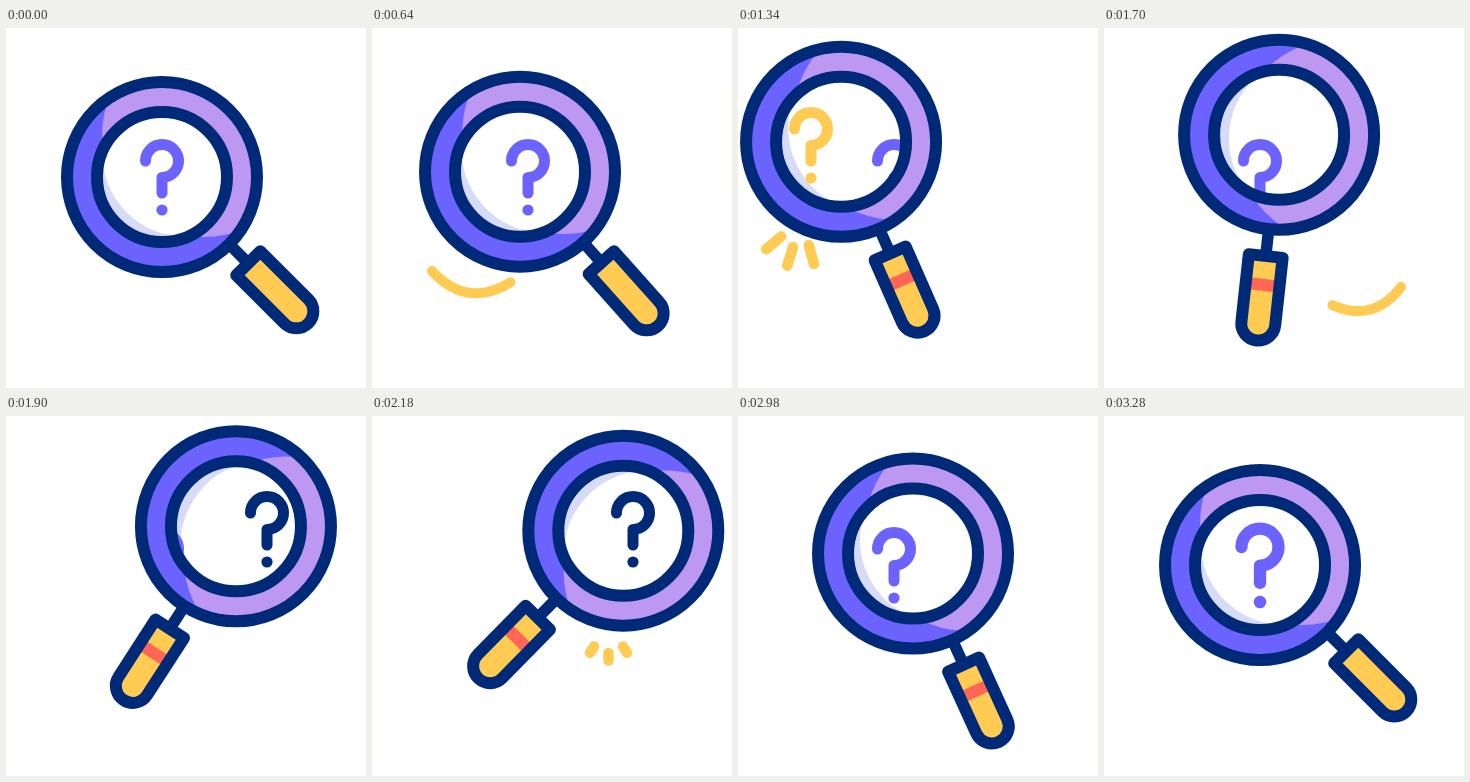
Animation of 360x360 px, one loop 3.3 s. Source, as an HTML page with a canvas:

```html
<!DOCTYPE html>
<html lang="en">
<head>
<meta charset="utf-8">
<title>Searching magnifier</title>
<style>
html, body { margin: 0; width: 100%; height: 100%; overflow: hidden; background: #fff; }
canvas { display: block; width: 360px; height: 360px; }
</style>
</head>
<body>
<canvas id="stage"></canvas>
<script>
const LOOP = 3300, TAU = Math.PI * 2;
const NAVY = '#002a77', PURPLE = '#6c63ff', LILAC = '#bd98f2';
const YELLOW = '#ffcb52', RED = '#ff6655', PALE = '#d8dbf6';

const canvas = document.getElementById('stage');
const dpr = window.devicePixelRatio || 1;
canvas.width = canvas.height = 360 * dpr;
const ctx = canvas.getContext('2d');

const clamp = v => Math.min(1, Math.max(0, v));
const mix = (a, b, p) => a + (b - a) * p;
const span = (t, a, b) => clamp((t - a) / (b - a));

// cubic-bezier(x1, 0, x2, 1), solved by bisection
function ease(x1, x2, t) {
  if (t <= 0 || t >= 1) return clamp(t);
  let lo = 0, hi = 1;
  for (let i = 0; i < 24; i++) {
    const s = (lo + hi) / 2, r = 1 - s;
    if (3 * r * r * s * x1 + 3 * r * s * s * x2 + s * s * s < t) lo = s; else hi = s;
  }
  return lo * lo * (3 - 2 * lo);
}

const HOME = { x: 156, y: 149, a: 45 };
const LEFT = { x: 103, y: 113.7, a: 66.3 };
const RIGHT = { x: 251.3, y: 114.7, a: 134.5 };
const MOVES = [
  { from: HOME, to: LEFT, start: 320, end: 1370, curve: [0.5, 0.6], bend: [0, 0] },
  { from: LEFT, to: RIGHT, start: 1370, end: 2090, curve: [0.333, 0.667], bend: [7, -7.5] },
  { from: RIGHT, to: HOME, start: 2450, end: 3300, curve: [0.6, 0.4], bend: [-4, -5] }
];

function poseAt(t) {
  const m = MOVES.filter(m => t >= m.start).pop() || MOVES[0];
  const p = ease(m.curve[0], m.curve[1], span(t, m.start, m.end));
  const k = 4 * p * (1 - p);
  return {
    x: mix(m.from.x, m.to.x, p) + m.bend[0] * k,
    y: mix(m.from.y, m.to.y, p) + m.bend[1] * k,
    a: mix(m.from.a, m.to.a, p) * Math.PI / 180
  };
}

function circle(x, y, r) {
  ctx.beginPath();
  ctx.arc(x, y, r, 0, TAU);
}

function disc(x, y, r, color) {
  circle(x, y, r);
  ctx.fillStyle = color;
  ctx.fill();
}

function ink(color, width) {
  ctx.strokeStyle = color;
  ctx.lineWidth = width;
  ctx.stroke();
}

function line(x1, y1, x2, y2, color, width) {
  ctx.beginPath();
  ctx.moveTo(x1, y1);
  ctx.lineTo(x2, y2);
  ink(color, width);
}

function question(x, y, color, scale) {
  ctx.save();
  ctx.translate(x, y);
  ctx.scale(scale, scale);
  ctx.beginPath();
  ctx.arc(0, -16, 16.5, Math.PI, Math.PI * 2.5);
  ctx.lineTo(0, 16);
  ink(color, 11);
  disc(0, 33, 5.6, color);
  ctx.restore();
}

function inLens(pose, radius, draw) {
  ctx.save();
  ctx.translate(pose.x, pose.y);
  ctx.rotate(pose.a - Math.PI / 2);
  circle(0, 0, radius);
  ctx.clip();
  draw();
  ctx.restore();
}

function lens(pose, t) {
  inLens(pose, 96, () => {
    disc(0, 0, 96, PURPLE);
    disc(59.5, 0, 102, LILAC);
  });
  inLens(pose, 65, () => {
    disc(0, 0, 65, PALE);
    disc(34, 0, 84, '#fff');
  });
  ctx.save();
  circle(pose.x, pose.y, 62);
  ctx.clip();
  question(73, 117, YELLOW, 1);
  question(261, 113, NAVY, 1);
  question(156, 149, PURPLE, 1 + 0.12 * ease(0.333, 0.667, span(t, 3100, 3280)));
  ctx.restore();
  for (const r of [95, 65]) {
    circle(pose.x, pose.y, r);
    ink(NAVY, 12);
  }
}

function handle(pose, t) {
  ctx.save();
  ctx.translate(pose.x, pose.y);
  ctx.rotate(pose.a);
  line(98, 0, 120, 0, NAVY, 11.5);
  ctx.beginPath();
  ctx.moveTo(122, 17);
  ctx.lineTo(122, -17);
  ctx.lineTo(190, -17);
  ctx.arc(190, 0, 17, -Math.PI / 2, Math.PI / 2);
  ctx.closePath();
  ctx.fillStyle = YELLOW;
  ctx.fill();
  if (t >= 980 && t < 3020) {
    ctx.fillStyle = RED;
    ctx.fillRect(145, -16, 12, 32);
  }
  // the path is still the handle outline
  ink(NAVY, 12);
  ctx.restore();
}

// Part of a quadratic curve whose head runs out before its tail follows
function swoosh(t, start, a, c, b) {
  const head = span(t, start, start + 200);
  const tail = span(t, start + 200, start + 400);
  if (head <= 0 || tail >= 1) return;
  const at = (u, i) => (1 - u) * (1 - u) * a[i] + 2 * u * (1 - u) * c[i] + u * u * b[i];
  ctx.beginPath();
  for (let i = 0; i <= 30; i++) {
    const u = mix(tail, head, i / 30);
    ctx.lineTo(at(u, 0), at(u, 1));
  }
  ink(YELLOW, 10);
}

function burst(t, start, hold, x, y, turn) {
  const head = span(t, start, start + 160);
  const tail = span(t, start + hold, start + hold + 160);
  if (head <= 0 || tail >= 1) return;
  ctx.save();
  ctx.translate(x, y);
  ctx.rotate(turn);
  for (const side of [-1, 0, 1]) {
    const x0 = side * 14.5, y0 = side ? -6.5 : 0;
    const dx = side * 10.5, dy = side ? 16.5 : 19.5;
    line(x0 + dx * tail, y0 + dy * tail, x0 + dx * head, y0 + dy * head, YELLOW, 10.5);
  }
  ctx.restore();
}

function draw(t) {
  ctx.setTransform(dpr, 0, 0, dpr, 0, 0);
  ctx.fillStyle = '#fff';
  ctx.fillRect(0, 0, 360, 360);
  ctx.lineCap = ctx.lineJoin = 'round';
  const pose = poseAt(t);
  swoosh(t, 440, [139, 254], [95, 281], [60, 243]);
  swoosh(t, 1500, [228, 277], [269.5, 295], [297, 259]);
  burst(t, 1180, 180, 55, 219, 0.3);
  burst(t, 2120, 180, 236.5, 237, 0);
  handle(pose, t);
  lens(pose, t);
}

const begin = performance.now();
function tick() {
  draw((performance.now() - begin) % LOOP);
  requestAnimationFrame(tick);
}
tick();
</script>
</body>
</html>
```
